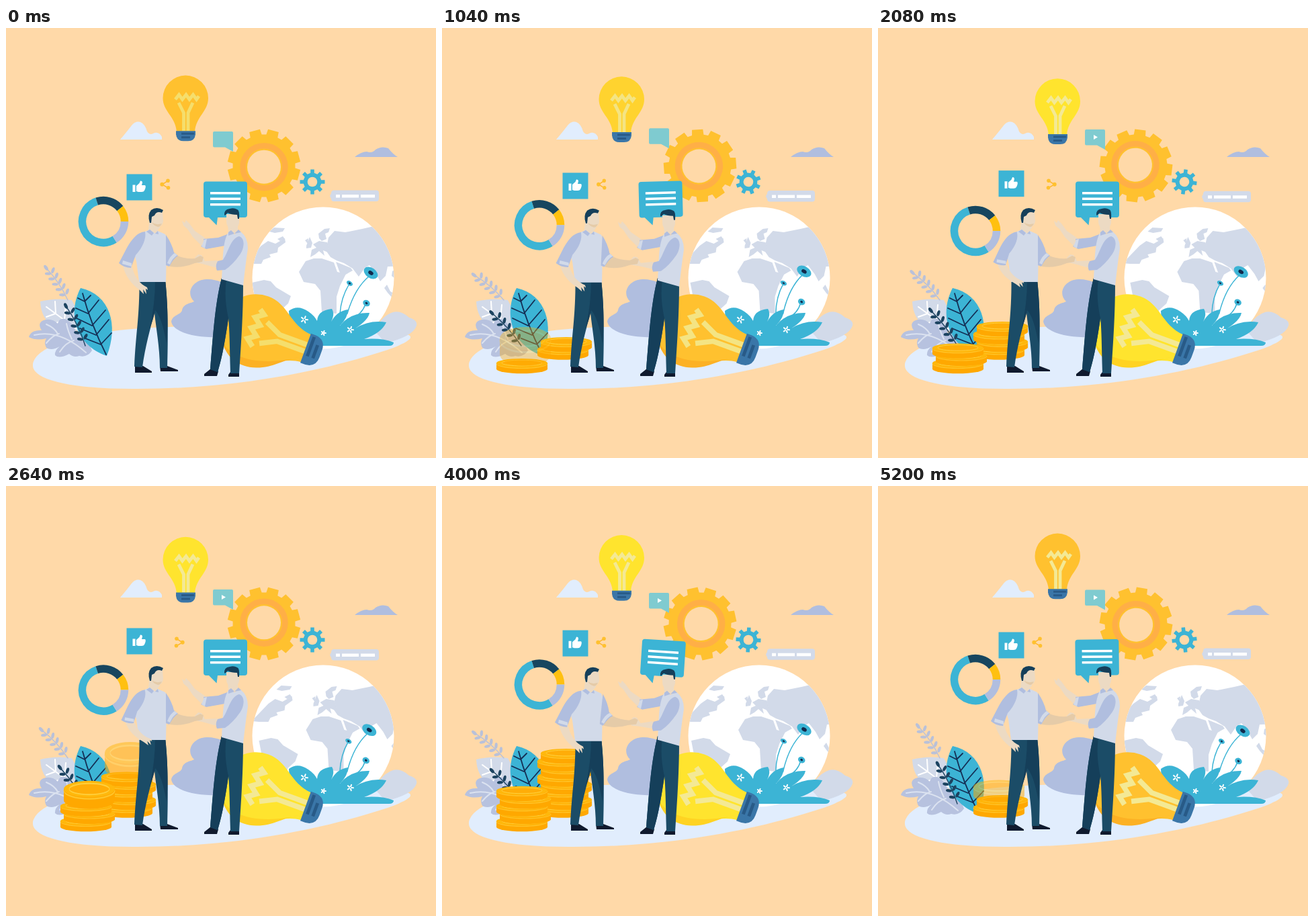
Animation, 640 px wide and 640 px high, one loop 5.28 s. Source, as an HTML page:

```html
<!DOCTYPE html>
<html lang="en">
<head>
<meta charset="utf-8">
<title>Partnership</title>
<style>
html, body { margin: 0; width: 100%; height: 100%; overflow: hidden; background: #ffd9a8; }
svg { display: block; width: 100vw; height: 100vh; }
.l { fill: none; stroke-linecap: round; stroke-linejoin: round; }
.cyan { fill: #3cb4d5; } .pale { fill: #d2dae9; } .lav { fill: #b0bedf; }
.navy { fill: #153f5a; } .teal { fill: #1b4c67; } .skin { fill: #ecdac3; } .tan { fill: #e5cba8; }
.gold { fill: #ffc12f; } .white { fill: #fff; } .ice { fill: #e1edfd; } .shoe { fill: #101a2e; }
</style>
</head>
<body>
<svg viewBox="0 0 640 640">
<defs><clipPath id="disc"><circle cx="472" cy="372" r="105.5"/></clipPath></defs>
<rect width="640" height="640" fill="#ffd9a8"/>

<path class="ice" d="M40 502C41 478 92 459 160 451C240 441 420 440 560 455C625 452 604 466 568 479C470 511 340 538 188 537C90 537 39 522 40 502Z"/>
<path class="pale" d="M548 450Q560 428 576 423Q588 420 600 431Q613 435 611 443Q606 459 565 469Z"/>
<path class="ice" d="M170 166Q181 153 187 145Q193 138 200 140Q207 143 210 154Q214 160 219 157Q227 153 232 162V166Z"/>
<path class="lav" d="M519 192Q529 184 537 184Q545 187 550 181Q559 175 569 179Q576 188 583 192Z"/>
<g id="search">
  <path class="pale" d="M488 241.500H551Q555 241.500 555 245.500V254Q555 258 551 258H488Q484 258 484 254L482 250L484 246Q484 241.500 488 241.500Z"/>
  <path class="white" d="M491 248h6v4.500h-6zM500 248h25v4.500h-25zM528 248h21v4.500h-21z"/>
</g>

<circle class="white" cx="472" cy="372" r="105.5"/>
<g clip-path="url(#disc)"><g id="land" class="pale">
  <path d="M476 331L480 312L489 302L505 304L530 299L552 294L600 330V354L568 355L565 369L557 377L551 366L541 353L534 357L525 370L516 358L503 350L492 346L483 341Z"/>
  <path d="M436 363L446 347L458 343L470 343L488 349L493 363L506 366L497 384L492 400L492 425L470 423L468 391L460 381L443 378Z"/>
  <path d="M491 348L513 357L516 361L500 370L496 362Z"/>
  <path d="M453 341L455 330L462 327L457 322L466 317L478 319L482 335L472 331L474 339L466 332L460 337Z"/>
  <path d="M466 313L465 306L474 299L482 298L480 304L475 306L477 314L470 317Z"/>
  <path d="M447 324L452 311L456 320L454 327L447 328ZM445 316l5-3l-1 8z"/>
  <path d="M355 350L380 324L390 317L401 321L415 313L416 319L405 327L404 334L392 337L394 341L383 345L380 351L366 351Z"/>
  <path d="M392 303L399 297L415 298L412 303L400 305ZM404 314l8-4l3 4l-7 3z"/>
  <path d="M366 379L384 375L394 377L402 386L424 399L420 410L409 420L404 440L380 440L372 410Z"/>
  <path d="M563 387l4-5l5 10l5 3v9l-9-10zM575 362l3-2v12l-4-3z"/>
</g></g>

<path class="lav" d="M246 437C247 427 261 427 262 420C264 410 275 410 280 407C267 395 277 375 298 374C316 373 326 383 340 381V455C310 466 250 459 246 437Z"/>

<g id="flowers"></g>
<path class="cyan" d="M424 473L421 421Q434 411 450 422Q459 428 463 436Q464 420 485 418Q490 425 484 437Q493 421 509 419Q509 431 497 443Q513 423 541 424Q539 435 520 447Q541 434 566 438Q559 454 533 463Q560 461 577 468Q577 473 570 473Z"/>
<g id="blossoms"></g>

<g id="bigBulb" transform="translate(372 450.500) rotate(-70) scale(1.6) translate(-267 -104)"></g>
<path id="shade" d="M323 469C338 494 383 503 437 490C410 494 398 506 372 505.500C346 505 328 490 323 469Z"/>
<g id="topBulb"></g>

<g id="plants">
  <path class="pale" d="M51 407Q75 401 98 405Q110 425 112 452L70 444Q52 432 51 407Z"/>
  <path class="l" stroke="#fff" stroke-width="2" d="M60 415L105 448M74 425L73 407M87 435L89 412M74 425L60 430M87 435L72 440"/>
  <path fill="#b7c2df" d="M34 460Q37 449 53 450Q46 439 56 435Q68 431 77 440Q79 431 88 433Q102 440 104 455Q117 452 121 463L128 480Q121 491 109 488Q101 491 94 485Q79 493 73 487Q72 480 80 474Q68 481 60 476Q56 468 60 462Q45 466 34 460Z"/>
  <path class="l" stroke="#dbe2f0" stroke-width="2" d="M42 457Q80 448 119 483M60 441Q72 446 77 455M90 440Q92 451 98 463M60 469Q70 457 79 455M80 482Q89 468 101 465"/>
  <g id="paleSprig"></g>
  <path class="cyan" d="M111 387C155 397 168 442 150 488C103 472 91 425 111 387Z"/>
  <path class="l" stroke="#142f55" stroke-width="1.800" d="M114 395Q126 440 149 486M117 407L107 402M117 407L126 398M122 425L104 417M122 425L138 405M128 443L105 432M128 443L148 420M134 457L110 447M134 457L153 434M141 471L118 462M141 471L157 454"/>
  <g id="darkSprig"></g>
</g>
<g id="coins"></g>

<g id="chart" class="l" stroke-width="11.500"></g>
<g id="like">
  <rect class="cyan" x="179.500" y="217.500" width="38" height="39"/>
  <path class="white" d="M188.500 233.500h4v10.500h-4zM194 243V235L198.500 231L200 227.500Q203 227 203 230L202 234H207Q209 236 206 242Q205 244 202 244H197Z"/>
</g>
<g id="share" class="gold">
  <path class="l" stroke="#ffb52b" stroke-width="1.500" d="M241 227L232.500 232.500L241 237.500"/>
  <circle cx="232.300" cy="232.500" r="3"/><circle cx="241" cy="227" r="2.800"/><circle cx="241.500" cy="237.500" r="2.800"/>
</g>
<g id="bigGear"></g>
<g id="smallGear"></g>
<g id="clip">
  <path fill="#7fcbd0" d="M310 154H336Q338 154 338 156V184L326 177.500H310Q308 177.500 308 175.500V156Q308 154 310 154Z"/>
  <path id="play" class="white" d="M321 162L327 165.500L321 169Z"/>
</g>
<g id="speech">
  <path class="cyan" d="M298 228.500H355Q359 228.500 359 232.500V278Q359 282 355 282H315L313.500 293.500L302 282H298Q294 282 294 278V232.500Q294 228.500 298 228.500Z"/>
  <path class="white" d="M304 244h45v3.500h-45zM304 252.500h45v3.500h-45zM304 261h45v3.500h-45z"/>
</g>

<g id="leftLegs">
  <path class="shoe" d="M192 503H204L217 511V513H192ZM229 503H240L256 509V511H230Z"/>
  <path class="teal" d="M198.500 374H237C240 402 242 440 240 506H229C229 475 223 445 221 424C215 446 207 475 203 505L191 504C193 455 199 430 198.500 374Z"/>
  <path class="navy" d="M222 376H237C240 402 242 440 239 470Q232 430 222 420Q219 435 214 446Q222 410 222 376Z"/>
</g>
<g id="leftTop">
  <path class="skin" d="M214 284H229V297Q225 301 224 306H211Z"/>
  <path class="skin" d="M217 275Q226 270 233 274L234 288Q232 296 226 296Q217 294 216 283Z"/>
  <path class="tan" d="M217 289Q223 294 232 291Q230 296 226 296Q219 294 217 289Z"/>
  <path class="navy" d="M214 290Q210 278 216 271Q224 265 234 271L232 275Q224 272 221 279L217 281L216 290Z"/>
  <path class="pale" d="M207 303L214 300L222 306L226 302L237 307Q242 318 239 334L238 378H198L194 347C188 330 194 308 207 303Z"/>
  <path class="lav" d="M209 303l5-3l6 5l-3 4zM222 306l4-4l1 5z"/>
  <g id="hipArm">
    <path class="skin" d="M174 354L188 356C191 370 199 381 210 386L211 390L208 388L209 396L204 389L205 396L199 390C186 380 178 370 174 354Z"/>
    <path class="lav" d="M207 303C195 304 187 315 180 327L168 350Q176 357 186 357L193 338C204 326 209 313 207 303Z"/>
    <path class="pale" d="M174 346l13 4v5l-14-4z"/>
  </g>
</g>

<g id="rightLegs">
  <path class="shoe" d="M305 507L316 511L314 518H295V515ZM334 512H347V519H331V516Z"/>
  <path class="teal" d="M321 372L353 381C353 425 350 470 347 514H334C333 480 333 450 331 432C327 460 322 490 315 512L304 508C308 460 311 410 321 372Z"/>
  <path class="navy" d="M321 372L328 375Q324 400 331 432C327 460 322 490 315 512L304 508C308 460 311 410 321 372Z"/>
</g>
<g id="rightTop">
  <path class="skin" d="M297 313L281 302L273 291L268 286L266 290L262 287L264 294L270 299L278 311L293 326Z"/>
  <path class="lav" d="M332 306L316 312L294 314Q297 320 290 325L298 329L326 324Z"/>
  <path class="pale" d="M295 315l4-1l-3 14l-5-3z"/>
  <path class="skin" d="M330 290H345V306H331Z"/>
  <path class="skin" d="M328 277H347V290Q345 300 337 299Q328 298 328 288Z"/>
  <path class="navy" d="M325 279Q324 270 333 269Q339 267 344 270Q348 271 347 284L345 284L344 278Q335 278 330 275L327 278Z"/>
  <path class="pale" d="M331 304L340 307L349 303Q360 311 360 328Q357 348 353 383L321 374C323 345 322 318 331 304Z"/>
  <path class="lav" d="M331 304l4-3l5 5l-9 3zM340 306l6-6l4 4z"/>
  <g id="rightHand"><path class="skin" d="M315 346L296 347L291 338L286 337L281 342L282 349L292 351L314 357Z"/></g>
  <path class="lav" d="M347 310C356 313 355 327 349 336Q338 352 326 360L314 361Q311 354 315 347L323 345C331 334 334 313 347 310Z"/>
</g>
<g id="shakeArm">
  <path class="tan" d="M244 350L253 338Q266 344 281 343L289 339L294 341L292 348L281 350Q262 358 244 355Z"/>
  <path class="lav" d="M238 308Q247 321 250 334L256 339Q250 342 243 355L238 353Z"/>
  <path class="pale" d="M251 335l4 3q-7 4-11 14l-4-2q4-11 11-15z"/>
</g>
</svg>

<script>
const LOOP = 5280, STEP = 80, TAU = Math.PI * 2;
const el = id => document.getElementById(id);
const fill = (id, markup) => { el(id).innerHTML = markup; };
const move = (id, transform) => el(id).setAttribute('transform', transform);
const clamp = v => Math.max(0, Math.min(1, v));
const ramp = (t, a, b) => clamp((t - a) / (b - a));
const ease = p => (1 - Math.cos(Math.PI * p)) / 2;
const mix = (a, b, p) => `rgb(${a.map((v, i) => Math.round(v + (b[i] - v) * p))})`;
const polar = (r, deg) => {
  const a = deg * TAU / 360;
  return `${(r * Math.sin(a)).toFixed(2)} ${(-r * Math.cos(a)).toFixed(2)}`;
};
const ellipse = (x, y, rx, ry, deg, attrs = '') =>
  `<ellipse rx="${rx}" ry="${ry}" transform="translate(${x} ${y}) rotate(${deg})" ${attrs}/>`;

const bulb = `
  <path class="glass" d="M233.500 104A33.700 33.700 0 0 1 301 104C301 124 283 131 281 154H254C252 131 233.500 124 233.500 104Z"/>
  <path class="wire" fill="none" stroke-width="4.800" d="M252 106L257.500 99L262.500 106L268 99L273 106L278.500 99L283.500 106L287 101M257 111L264.500 126V153M278 111L271 126V153"/>
  <path fill="#3a76a8" d="M253 153H282V158Q281 168 271 168H264Q254 168 253 158Z"/>
  <path fill="#285a87" d="M261 155.500h19v3h-19zM261 161h13v3h-13z"/>`;

function gear(teeth, outer, root, topHalf, baseHalf, offset) {
  const points = [];
  for (let i = 0; i < teeth; i++) {
    const a = offset + i * 360 / teeth;
    points.push(polar(root, a - baseHalf), polar(outer, a - topHalf), polar(outer, a + topHalf), polar(root, a + baseHalf));
  }
  return `M${points.join('L')}Z`;
}

function sprig(x, y, length, deg, color, pairs) {
  let s = `<path class="l" stroke="${color}" stroke-width="1.400" d="M0 0Q5 ${-length / 2} 0 ${-length}"/>`;
  s += ellipse(0, -length, 2.4, 4.6, 0);
  for (let i = 0; i < pairs; i++) {
    const h = -length * (0.14 + 0.82 * i / pairs);
    s += ellipse(6.5, h - 3, 2.2, 4.6, 55) + ellipse(-2.5, h - 3, 2.2, 4.6, -55);
  }
  return `<g fill="${color}" transform="translate(${x} ${y}) rotate(${deg})">${s}</g>`;
}

const arc = ([from, to, color]) =>
  `<path stroke="${color}" stroke-linecap="butt" d="M${polar(31.5, from)}A31.5 31.5 0 ${to - from > 180 ? 1 : 0} 1 ${polar(31.5, to)}"/>`;

const blossom = (x, y, r) => {
  let s = '';
  for (let i = 0; i < 5; i++) s += `<path class="l" stroke="#fff" stroke-width="2" d="M${polar(r * 0.4, i * 72 + 20)}L${polar(r, i * 72 + 20)}"/>`;
  return `<g transform="translate(${x} ${y})">${s}</g>`;
};

const head = (x, y, rx, ry) => ellipse(x, y, rx, ry, 35, 'class="cyan"') + ellipse(x, y, rx * 0.36, ry * 0.36, 35, 'fill="#122a4c"');

// Coins stand on y = 0 so that they stretch upwards.
const coin = `<g transform="translate(0 -22)">
  <path fill="#ffa800" d="M0 6.500V15.500A38 6.800 0 0 0 76 15.500V6.500Z"/>
  <path fill="none" stroke="#ffc62b" stroke-width="1.200" d="M0 7.500A38 6.800 0 0 0 76 7.500"/>
  <ellipse cx="38" cy="6.500" rx="38" ry="6.500" fill="#ffb80c"/>
  <ellipse cx="38" cy="6.500" rx="30" ry="4.400" fill="#ffad08" stroke="#ffcf3d" stroke-width="1"/></g>`;

const coins = [];
const stack = (count, x, y, gap, firstLand, every, lastLeave) => {
  for (let i = 0; i < count; i++) coins.push({
    x: x + (i % 2) * 5, y: y - i * gap,
    land: firstLand + i * every, leave: lastLeave - i * 80
  });
};
stack(8, 142, 493.5, 11.5, 480, 480, 5440);
stack(5, 81, 514, 11.3, 560, 740, 4920);

fill('topBulb', bulb);
fill('bigBulb', bulb);
fill('chart', [[148, 342, '#3cb4d5'], [342, 412, '#17465f'], [52, 90, '#ffc010'], [90, 148, '#b0bedf']].map(arc).join(''));
fill('bigGear', `<path class="gold" d="${gear(12, 54.5, 46.5, 8.6, 10.8, 15)}"/>
  <g transform="translate(0 1.700)"><circle r="31.500" fill="none" stroke="#ffaf46" stroke-width="8.500"/><circle r="25" fill="#ffd9a8"/></g>`);
fill('smallGear', `<path class="cyan" d="${gear(8, 18.7, 13.5, 8.5, 12, 0)}"/><circle r="7.300" fill="#ffd9a8"/>`);
fill('flowers', `<path class="l" stroke="#3cb4d5" stroke-width="1.500" d="M497 425Q499 400 511 381M508 425Q519 387 541 369M513 434Q530 426 535 411"/>`
  + head(543, 364.5, 11.5, 7.5) + head(511.5, 380, 5, 3.2) + head(536.5, 409.5, 5.5, 4.5));
fill('blossoms', blossom(444, 434, 5) + blossom(472.5, 454, 3.3) + blossom(512.5, 449, 4.5));
fill('paleSprig', sprig(92, 405, 58, -34, '#b9c1d9', 5));
fill('darkSprig', sprig(118, 473, 66, -26, '#1c4360', 5));
fill('coins', coins.map(() => `<g>${coin}</g>`).join(''));
const coinNodes = [...el('coins').children];

// Plants lean out, relax halfway, lean again and return.
function lean(t) {
  const u = Math.min(t, LOOP - t);
  return u < 1000 ? -16 * ease(u / 1000) : -16 + 7 * ease((u - 1000) / 1640);
}

// Two gestures per loop share one start rhythm.
const gesture = (t, length, wave) => {
  const u = t >= 3360 ? t - 3360 : t;
  return u < length ? wave(u / length) : 0;
};

function paintBulb(id, glow, warmth) {
  const node = el(id);
  node.querySelector('.glass').style.fill = mix([255, 193, 47], [255, 228, 46], glow);
  node.querySelector('.wire').style.stroke = mix([245, 222, 108], [244, 233, 148], warmth);
}

function draw(t) {
  const phase = TAU * t / LOOP;
  const drift = (1 - Math.cos(phase)) / 2;
  const turn = 360 * t / LOOP;

  move('topBulb', `translate(0 ${0.3 + 5.3 * drift})`);
  move('chart', `translate(145 ${288 + 15.6 * drift})`);
  move('like', `translate(0 ${-6 * drift})`);
  move('search', `translate(0 ${1.5 * drift})`);
  move('land', `translate(${10.5 * drift} 0)`);
  move('clip', `translate(0 ${-5 * Math.sin(phase)})`);
  move('bigGear', `translate(384 205) rotate(${turn})`);
  move('smallGear', `translate(456 229) rotate(${turn})`);

  const back = 1 - ramp(t, 4560, 5120);
  const topGlow = ramp(t, 800, 1280) * back;
  const bigGlow = ramp(t, 1400, 1900) * back;
  const warmth = ramp(t, 700, 1300);
  paintBulb('topBulb', topGlow, warmth);
  paintBulb('bigBulb', bigGlow, warmth);
  el('shade').style.fill = mix([252, 177, 36], [255, 211, 34], bigGlow);

  const flip = Math.cos(Math.PI * ramp(t, 960, 1800) * (1 - ramp(t, 3300, 3900)));
  move('share', `translate(247.5 0.3) scale(${flip} 1) translate(-247.5 0)`);
  const play = ramp(t, 1360, 1760);
  el('play').style.opacity = play;
  move('play', `translate(${-8 * (1 - play)} 0)`);

  const tilt = gesture(t, 1880, p => 4.4 * Math.sin(TAU * p));
  move('speech', `rotate(${tilt} 313 293)`);

  const sway = lean(t);
  move('paleSprig', `rotate(${sway} 92 405)`);
  move('darkSprig', `rotate(${sway} 118 473)`);
  move('flowers', `rotate(${sway * 0.22} 505 430)`);

  const shake = gesture(t, 1360, p => (1 - Math.cos(TAU * p)) / 2);
  move('leftTop', `translate(0 ${1.8 * shake})`);
  move('rightTop', `translate(0 ${3.8 * shake})`);
  move('rightHand', `rotate(${-6 * shake} 318 352)`);
  move('shakeArm', `translate(0 ${1.8 * shake}) rotate(${6 * shake} 242 322)`);
  const hip = ease(ramp(t, 720, 1400)) * (1 - ease(ramp(t, 3300, 3960)));
  move('hipArm', `translate(204 308) rotate(${-5 * hip}) scale(1 ${1 - 0.11 * hip}) translate(-204 -308)`);

  coins.forEach((c, i) => {
    const enter = ramp(t, c.land - 320, c.land);
    const leave = ramp(t, c.leave - 160, c.leave);
    const stretch = 1 + 2 * (1 - enter) + leave;
    coinNodes[i].setAttribute('transform', `translate(${c.x} ${c.y}) scale(1 ${stretch})`);
    coinNodes[i].style.opacity = Math.min(1, 2 * enter) * (1 - leave);
  });
}

function tick() {
  draw(Math.floor(performance.now() / STEP) * STEP % LOOP);
  requestAnimationFrame(tick);
}
tick();
</script>
</body>
</html>
```
